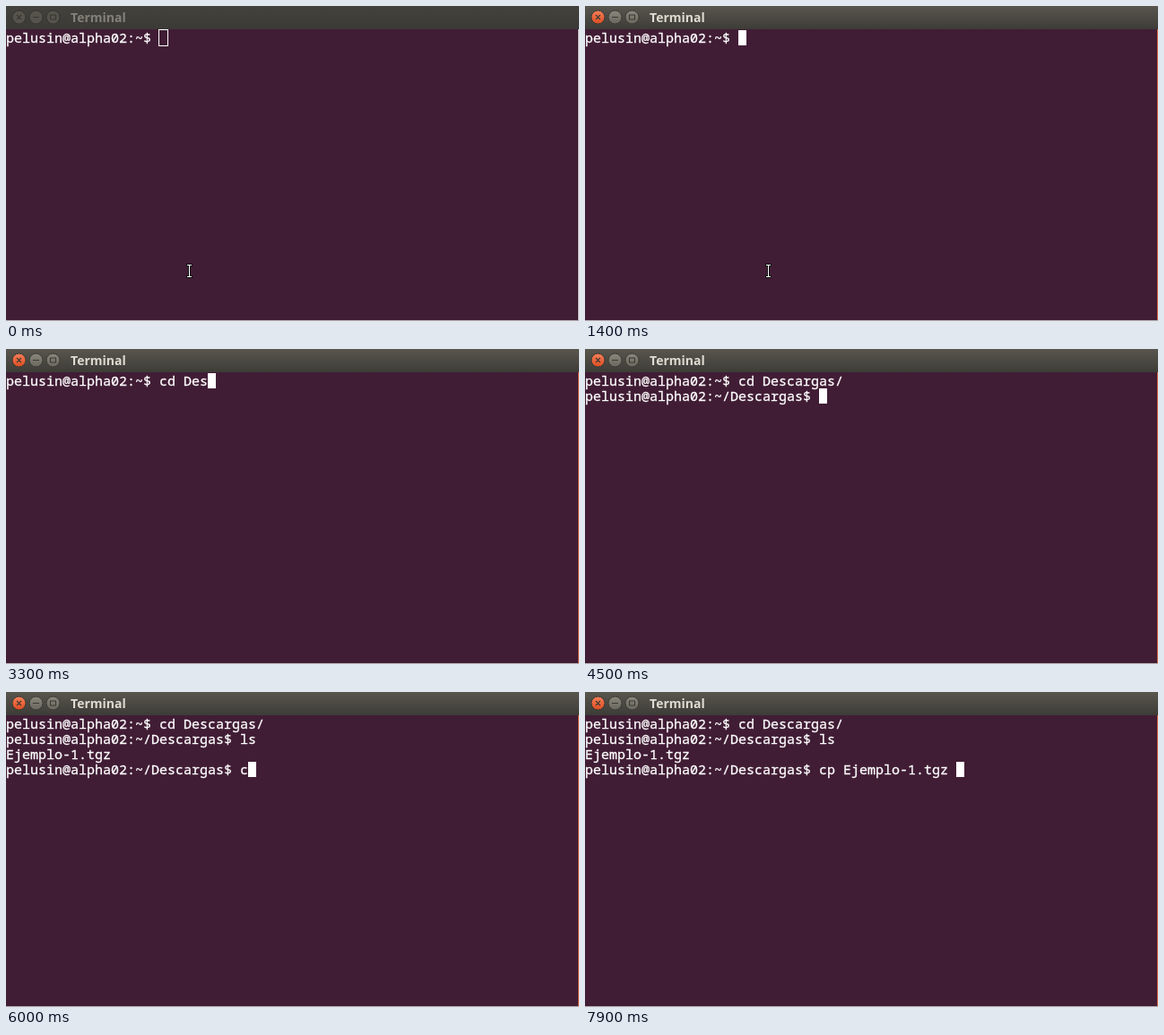
An HTML page for the animation above (8 s loop, 639x352 px).

```html
<!DOCTYPE html>
<html lang="es">
<head>
<meta charset="utf-8">
<title>Terminal</title>
<style>
  html, body { margin: 0; width: 100%; height: 100%; overflow: hidden; background: #411d35; }
  svg { display: block; }
  .title { font: 700 14px "Open Sans", "Noto Sans", sans-serif; fill: #dfdbd2; }
  .line {
    font: 15px "Noto Sans Mono", "DejaVu Sans Mono", monospace;
    fill: #fff; stroke: #fff; stroke-width: 0.3; white-space: pre;
  }
  .bar { fill: url(#barOn); }
  .button { fill: url(#grey); stroke: #3a3934; }
  .close { fill: url(#orange); }
  .glyph { fill: none; stroke: #3a3934; stroke-width: 1.1; }
  .edge { fill: #d9694a; }
  .idle .bar { fill: url(#barOff); }
  .idle .title { fill: #84817a; }
  .idle .button { fill: #55534c; stroke: #34332f; }
  .idle .glyph { stroke: #37362f; }
  .idle .edge { fill: #d8d3d3; }
</style>
</head>
<body>
<svg id="stage" width="639" height="352" viewBox="0 0 639 352">
  <defs>
    <linearGradient id="barOn" x2="0" y2="1">
      <stop offset="0" stop-color="#58564d"/><stop offset="1" stop-color="#3d3c37"/>
    </linearGradient>
    <linearGradient id="barOff" x2="0" y2="1">
      <stop offset="0" stop-color="#43423d"/><stop offset="1" stop-color="#3b3a36"/>
    </linearGradient>
    <linearGradient id="grey" x2="0" y2="1">
      <stop offset="0" stop-color="#8a877c"/><stop offset="1" stop-color="#69675e"/>
    </linearGradient>
    <linearGradient id="orange" x2="0" y2="1">
      <stop offset="0" stop-color="#f4805a"/><stop offset="1" stop-color="#dd4c20"/>
    </linearGradient>
  </defs>
  <rect width="639" height="352" fill="#411d35"/>
  <rect class="bar" width="639" height="26"/>
  <circle class="button close" cx="14.5" cy="12.5" r="7.5"/>
  <circle class="button" cx="33.5" cy="12.5" r="7.5"/>
  <circle class="button" cx="52.5" cy="12.5" r="7.5"/>
  <path class="glyph" d="M12 10l5 5m0-5l-5 5M30 12.5h7M49.5 10h6v5h-6z"/>
  <text class="title" x="72" y="18">Terminal</text>
  <rect class="edge" x="638" y="26" width="1" height="325"/>
  <rect y="351" width="639" height="1" fill="#b5acb1"/>
  <g id="lines"></g>
  <rect id="cursor"/>
  <g id="pointer" fill="none">
    <path d="M201 289.5h7M204.5 289v14M201 302.5h7" stroke="#111" stroke-width="3"/>
    <path d="M202 289.5h5M204.5 289v14M202 302.5h5" stroke="#fff"/>
  </g>
</svg>
<script>
const LOOP = 8000, BLINK = 600, FOCUS = 200;
const CELL_W = 9, CELL_H = 17, TOP = 27, BASELINE = 14;
const USER = "pelusin@alpha02:";
const HOME = USER + "~$ ", FOLDER = USER + "~/Descargas$ ";

// Time of each step and the output it adds
const steps = [
  [0, HOME], [FOCUS, ""],
  [1600, "c"], [1800, "d"], [2700, " "], [3000, "D"], [3200, "e"], [3300, "s"],
  [3500, "cargas/"], [4500, "\n" + FOLDER],
  [5000, "l"], [5100, "s"], [5300, "\nEjemplo-1.tgz\n" + FOLDER],
  [6000, "c"], [6100, "p"], [6200, " "], [6500, "E"], [6700, "jemplo-1.tgz "]
];

const byId = id => document.getElementById(id);
const stage = byId("stage"), cursor = byId("cursor"), pointer = byId("pointer");

function setAttrs(node, attrs) {
  for (const name in attrs) node.setAttribute(name, attrs[name]);
}

const rows = Array.from({ length: 4 }, (_, i) => {
  const row = document.createElementNS("http://www.w3.org/2000/svg", "text");
  setAttrs(row, { class: "line", x: 0, y: TOP + i * CELL_H + BASELINE });
  return byId("lines").appendChild(row);
});

function placeCursor(col, row, focused) {
  const inset = focused ? 0 : -0.5;
  setAttrs(cursor, {
    x: col * CELL_W + inset,
    y: TOP + row * CELL_H + inset,
    width: CELL_W - 2 * inset,
    height: CELL_H - 2 * inset,
    fill: focused ? "#fff" : "none",
    stroke: focused ? "none" : "#fff"
  });
}

function draw(t) {
  const done = steps.filter(([at]) => at <= t);
  const lines = done.map(([, text]) => text).join("").split("\n");
  const last = lines.length - 1;
  const since = t - done[done.length - 1][0];
  const focused = t >= FOCUS;

  rows.forEach((row, i) => {
    const text = lines[i] || "";
    if (row.textContent !== text) row.textContent = text;
  });
  stage.classList.toggle("idle", !focused);
  placeCursor(lines[last].length, last, focused);
  cursor.style.display = Math.floor(since / BLINK) % 2 ? "none" : "";
  pointer.style.display = t < 1600 ? "" : "none";
}

const start = performance.now();
function tick() {
  draw((performance.now() - start) % LOOP);
  requestAnimationFrame(tick);
}
tick();
</script>
</body>
</html>
```
